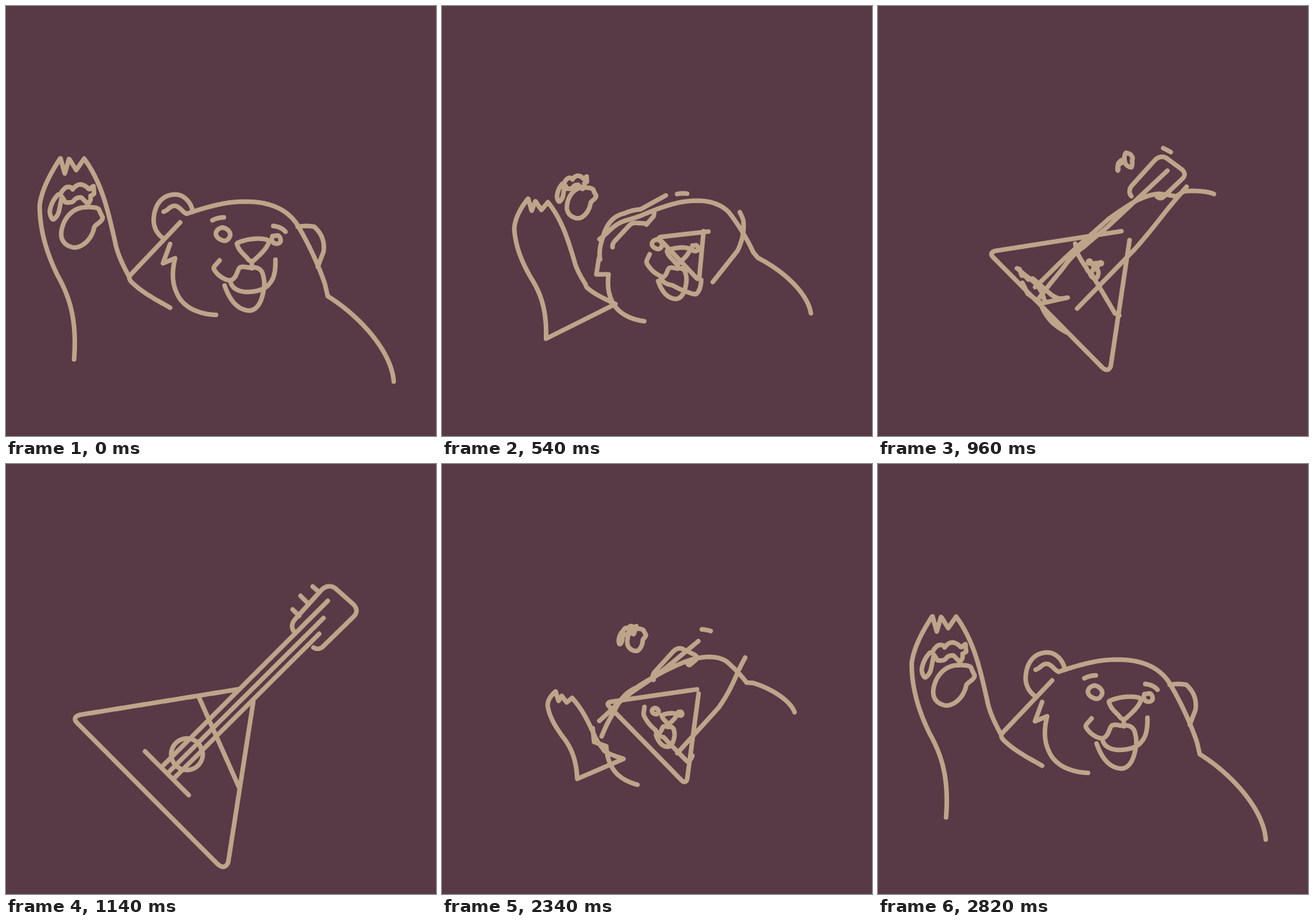
An HTML page that plays this animation: 600x600 px, repeating every 2.88 s.

```html
<!DOCTYPE html>
<html lang="en">
<head>
<meta charset="utf-8">
<title>Bear and balalaika</title>
<style>
  html, body { margin: 0; width: 100%; height: 100%; overflow: hidden; background: #583946; }
  svg { display: block; width: 100%; height: 100%; }
  path { fill: none; stroke: #bea58a; stroke-width: 6.4; stroke-linecap: round; stroke-linejoin: round; }
</style>
</head>
<body>
<svg viewBox="0 0 600 600"><path id="ink"/></svg>
<script>
const LOOP = 2880, STEP = 60;
const OUT_START = 360, OUT_STEPS = 14;
const BACK_START = 1980, BACK_STEPS = 15;
const ink = document.getElementById('ink');

// Cuts a straight line at the given fractions into path pieces
function cut(x0, y0, x1, y1, ...stops) {
  const at = f => `${x0 + (x1 - x0) * f},${y0 + (y1 - y0) * f}`;
  const all = [0, ...stops, 1];
  return all.slice(1).map((f, i) => `M${at(all[i])}L${at(f)}`);
}

// Anticlockwise arcs between the given angles in degrees
function arcs(cx, cy, r, ...angles) {
  const at = a => `${cx + r * Math.cos(a * Math.PI / 180)},${cy - r * Math.sin(a * Math.PI / 180)}`;
  return angles.slice(1).map((a, i) => `M${at(angles[i])}A${r},${r} 0 0 0 ${at(a)}`);
}

const POINT = ['M293,368h.1'];

// Each stroke pairs pieces of the bear with pieces of the balalaika
const strokes = [
  { // raised arm, sound hole
    bear: ['M95,493C99,440 90,408 72,376C55,341 47,310 47,278', 'M47,278C50,255 63,232 76,212L82,234L88,213L98,229L109,213', 'M109,213C135,248 143,290 152,328L153,333C157,350 165,365 172,378Q172,382 175,385C190,400 210,410 229,421'],
    lute: arcs(252.5, 405, 22, 35, 140, 250, 365),
    loop: true
  },
  { // palm, middle peg
    bear: ['M108,281C118,280 128,281 130,284Q131,288 135,295C134,302 125,304 123,309C120,325 107,337 95,337C82,335 77,327 77,318C78,300 90,283 108,281Z'],
    lute: ['M411,184L422,195L411,184'],
    loop: true
  },
  { // toes, lower peg
    bear: ['M118,265L123,262L122,251L116,256Q110,249 103,249Q97,250 93,256Q91,251 84,253Q78,257 76,263L73,263C67,268 62,278 61,287Q62,296 66,298Q72,294 74,286L78,266L83,274Q93,275 95,271Q98,267 105,267L114,276Q119,272 118,265Z'],
    lute: ['M400,203L409,212L400,203'],
    loop: true
  },
  { // shoulder, headstock
    bear: cut(172, 377, 243, 302, .3, .47),
    lute: ['M403,235C398,230 398,223 403,217L440,176Q449,167 459,173', 'M459,173L485,196Q493,205 485,213', 'M485,213L444,253Q437,261 429,256']
  },
  { // left ear, middle string
    bear: ['M218,323C210,317 206,308 206,298', 'M206,298C207,276 219,263 236,263', 'M236,263C243,263 248,266 252,270', 'M252,270Q258,276 260,284'],
    lute: cut(227, 430, 443, 215, .2, .35, .52)
  },
  { // head and back, upper string
    bear: ['M220,287C228,284 229,278 237,279C243,281 246,287 252,290', 'M252,290C275,282 305,273 330,273', 'M330,273C365,272 390,282 405,303', 'M405,303C420,327 436,361 445,388', 'M445,388L449,405', 'M449,405C490,430 538,480 541,524'],
    lute: cut(219, 421, 449, 191, .53, .65, .74, .82, .88)
  },
  { // right ear, lower string
    bear: ['M407,308Q420,306 430,308', 'M430,308Q446,322 443,343', 'M443,343L435,364'],
    lute: cut(437, 237, 235, 438, .2, .5)
  },
  { // cheek, bridge
    bear: ['M229,332L219,359', 'M219,359L236,352', 'M236,352C231,372 232,388 239,402C247,420 268,430 293,431'],
    lute: cut(194, 401, 255, 462, .2, .48)
  },
  { // left brow, upper peg
    bear: ['M288,299Q296,295 304,295'],
    lute: ['M428,171L437,179']
  },
  { // right brow, body
    bear: ['M390,315Q384,308 373,307'],
    lute: ['M326,314L103,350Q93,353 98,360L295,558Q305,567 310,556L345,332']
  },
  { // smile, crossbar
    bear: ['M298,355C294,360 289,364 290,367C295,376 304,382 313,383', 'M313,383C314,392 321,398 335,399', 'M335,399Q347,399 355,396', 'M355,396Q364,393 368,387', 'M368,387C375,379 376,368 376,354'],
    lute: cut(269, 325, 326, 453, .28, .32, .62, .9)
  },
  { // chin and muzzle
    bear: ['M305,390C312,410 323,425 341,425C353,423 358,408 360,393C361,386 360,380 358,373C356,367 350,364 343,365C337,366 332,362 326,365C322,370 322,380 313,383'],
    lute: POINT
  },
  { // nose
    bear: ['M343,366V356Q339,356 336,351C330,345 324,340 322,331C335,325 352,323 364,326Q368,328 366,332C361,342 352,349 347,354Q345,356 343,356'],
    lute: POINT
  },
  { // left eye
    bear: ['M302,309C308,310 313,314 313,320C311,326 307,329 302,327C296,325 292,321 293,316C295,311 298,310 302,309Z'],
    lute: POINT
  },
  { // right eye
    bear: ['M372,321L380,320Q384,324 383,329Q380,333 374,331Q369,327 372,321Z'],
    lute: POINT
  }
];

function makePath(d) {
  const path = document.createElementNS('http://www.w3.org/2000/svg', 'path');
  path.setAttribute('d', d);
  return path;
}

// Matching points, evenly spaced along both pieces
function pairUp(from, to) {
  const a = makePath(from), b = makePath(to);
  const la = a.getTotalLength(), lb = b.getTotalLength();
  const n = Math.ceil(Math.max(la, lb) / 1.5);
  return Array.from({ length: n + 1 }, (_, i) => [
    a.getPointAtLength(la * i / n),
    b.getPointAtLength(lb * i / n)
  ]);
}

for (const s of strokes) s.points = s.bear.flatMap((d, i) => pairUp(d, s.lute[i]));

function progress(t) {
  const steps = from => Math.floor((t - from) / STEP) + 1;
  if (t < OUT_START) return 0;
  if (t < BACK_START) return Math.min(1, steps(OUT_START) / OUT_STEPS);
  return Math.max(0, 1 - steps(BACK_START) / BACK_STEPS);
}

function outline(s, p) {
  if (p === 1 && s.lute === POINT) return '';
  const mix = (a, b) => (a + (b - a) * p).toFixed(2);
  const d = s.points.map(([a, b]) => mix(a.x, b.x) + ',' + mix(a.y, b.y));
  return 'M' + d.join('L') + (s.loop && p > 0 ? 'Z' : '');
}

let shown = -1;
const start = performance.now();

function draw() {
  const p = progress((performance.now() - start) % LOOP);
  if (p !== shown) {
    ink.setAttribute('d', strokes.map(s => outline(s, p)).join(''));
    shown = p;
  }
  requestAnimationFrame(draw);
}
draw();
</script>
</body>
</html>
```
